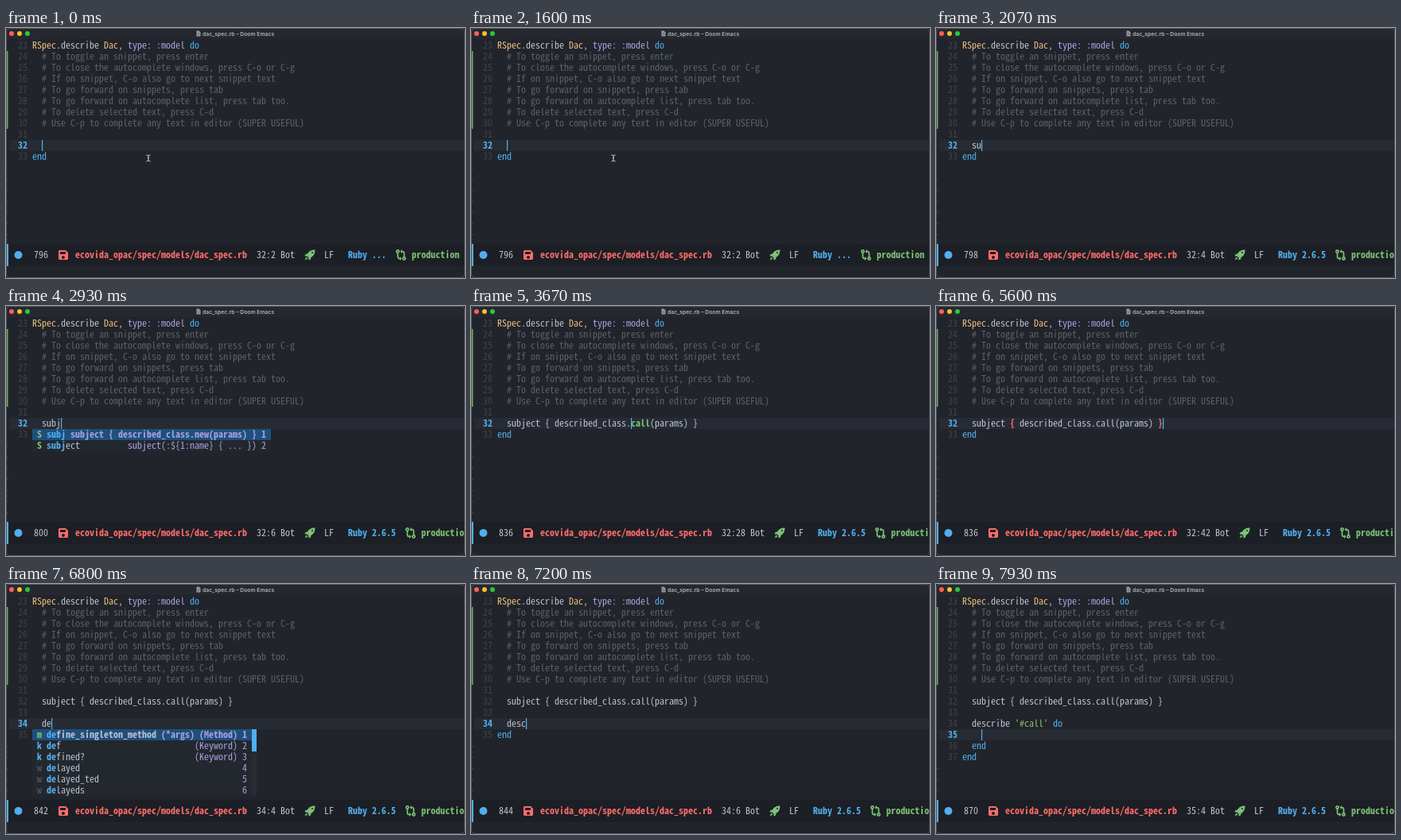
Recreate the animation shown at these times as an HTML page. Size 577 by 315 pixels, loop 8000 ms.

```html
<!DOCTYPE html>
<html lang="en">
<head>
<meta charset="utf-8">
<title>Snippets in the editor</title>
<style>
html, body { margin: 0; width: 100%; height: 100%; overflow: hidden; background: #21242b; }
svg { display: block; width: 577px; height: 315px; }
text { white-space: pre; font-family: "Noto Sans Mono CJK JP", "Noto Sans Mono", monospace; }
.title { font: 600 6.8px Inter, sans-serif; }
</style>
</head>
<body>
<svg id="stage" viewBox="0 0 577 315"></svg>
<script>
const LOOP = 8000, CELL = 6, ROW = 14, LEFT = 33, TOP = 15, FIRST = 23, ROWS = 18;
const BG = '#21242b', BAR = '#1c1f25', CURRENT = '#272b33';
// Run codes: one colour letter, upper case for bold, then the text.
const COLORS = {
  w: '#bbc2cf', y: '#ecbe7b', p: '#a9a1e1', b: '#51afef', c: '#5b6268',
  g: '#7bc275', s: '#98be65', r: '#ff6c6b', n: '#3f444a'
};
const stage = document.getElementById('stage');

// Choose the size at which one monospace cell is six pixels wide.
const meter = document.createElement('canvas').getContext('2d');
meter.font = '100px "Noto Sans Mono CJK JP", "Noto Sans Mono", monospace';
const fontSize = 100 * CELL / meter.measureText('m').width;

const rect = (x, y, w, h, fill) =>
  `<rect x="${x}" y="${y}" width="${w}" height="${h}" fill="${fill}"/>`;
const circle = (x, y, r, fill) => `<circle cx="${x}" cy="${y}" r="${r}" fill="${fill}"/>`;
const rowTop = row => TOP + row * ROW;

function runs(x, middle, line) {
  return line.split('|').map(run => {
    const code = run[0], text = run.slice(1), key = code.toLowerCase();
    const weight = code === key ? 400 : 700;
    const out = `<text x="${x}" y="${middle + 4}" font-size="${fontSize}" font-weight="${weight}" fill="${COLORS[key]}">${text}</text>`;
    x += text.length * CELL;
    return out;
  }).join('');
}

const HEAD = [
  'yRSpec|w.describe |yDac|w, |ptype: :model |bdo',
  ...[
    'To toggle an snippet, press enter',
    'To close the autocomplete windows, press C-o or C-g',
    'If on snippet, C-o also go to next snippet text',
    'To go forward on snippets, press tab',
    'To go forward on autocomplete list, press tab too.',
    'To delete selected text, press C-d',
    'Use C-p to complete any text in editor (SUPER USEFUL)'
  ].map(note => 'c  # ' + note),
  'w'
];
const SUBJECT = 'w  subject { described_class.call(params) }';

const SUBJECT_MENU = {
  cols: 50,
  rows: [
    'w |GS |Bsubj |Psubject { described_class.new(params) } 1',
    'w |GS |Bsubj|wect          |psubject(:${1:name} { ... }) 2'
  ]
};
const keyword = (kind, rest, note, number) =>
  `w |${kind} |Bde|w${rest}` + ' '.repeat(38 - rest.length - note.length) + `|p${note} ${number}`;
const DEF_MENU = {
  cols: 47,
  scroll: true,
  rows: [
    'w |Gm |Bde|Wfine_singleton_method |P(*args) (Method) 1',
    keyword('Bk', 'f', '(Keyword)', 2),
    keyword('Bk', 'fined?', '(Keyword)', 3),
    keyword('cw', 'layed', '', 4),
    keyword('cw', 'layed_ted', '', 5),
    keyword('cw', 'layeds', '', 6)
  ]
};

// Each step: start time, buffer size, cursor line and column, body lines, menu.
const steps = [];
const step = (time, size, line, col, body, menu) => steps.push({ time, size, line, col, body, menu });
function type(word, times, size, line, before) {
  times.forEach((time, i) =>
    step(time, size + i, line, 3 + i, [...before, 'w  ' + word.slice(0, i + 1)]));
}

step(0, 796, 32, 2, ['w']);
type('subj', [1930, 2070, 2200, 2400], 797, 32, []);
step(2600, 800, 32, 6, ['w  subj'], SUBJECT_MENU);
step(3330, 836, 32, 28, ['w  subject { described_class.|Gcall|w(params) }']);
step(5000, 836, 32, 42, ['w  subject |R{|w described_class.call(params) |R}']);
step(5930, 839, 33, 2, [SUBJECT, 'w']);
step(6070, 840, 34, 2, [SUBJECT, 'w', 'w']);
type('de', [6330, 6470], 841, 34, [SUBJECT, 'w']);
step(6600, 842, 34, 4, [SUBJECT, 'w', 'w  de'], DEF_MENU);
step(6930, 843, 34, 5, [SUBJECT, 'w', 'w  des']);
step(7070, 844, 34, 6, [SUBJECT, 'w', 'w  desc']);
step(7330, 870, 34, 13, [SUBJECT, 'w', "w  describe |s'#|Gcall|s'|b do", 'w', 'b  end']);
step(7670, 870, 35, 4, [SUBJECT, 'w', "w  describe |s'#call'|b do", 'w', 'b  end']);

function titleBar() {
  return rect(0, 0, 577, 14, '#25282e') +
    circle(7, 7, 3, '#ff5f57') + circle(17, 7, 3, '#febc2e') + circle(27, 7, 3, '#28c840') +
    '<path d="M239.500 3.500h3l2 2v5h-5z" fill="#9a9da3"/><path d="M240.500 6.500h3M240.500 8.500h3" stroke="#44474d" stroke-width=".6"/>' +
    '<text class="title" x="247" y="9.500" fill="#b4b6ba">dac_spec.rb – Doom Emacs</text>';
}

function editor({ line, col, body }) {
  const lines = [...HEAD, ...body, 'bend'];
  const current = line - FIRST;
  let out = rect(4, rowTop(current), 573, ROW, CURRENT);
  lines.forEach((text, i) => {
    const middle = rowTop(i) + 7;
    out += runs(15, middle, (i === current ? 'B' : 'n') + (FIRST + i)) + runs(LEFT, middle, text);
  });
  for (let i = lines.length; i < ROWS; i++) out += rect(1, rowTop(i) + 7, 2, 1, '#3f444a');
  return out + rect(1, rowTop(1), 1.5, 7 * ROW, '#72ad62') +
    rect(LEFT + col * CELL, rowTop(current), 1.2, ROW, COLORS.b);
}

function menuBox({ line, menu }) {
  if (!menu) return '';
  const top = rowTop(line - FIRST + 1), width = menu.cols * CELL, height = menu.rows.length * ROW;
  let out = rect(LEFT, top, width, height, '#23272e') + rect(LEFT, top, width, ROW, '#1f4f7c');
  menu.rows.forEach((row, i) => out += runs(LEFT, top + i * ROW + 7, row));
  if (menu.scroll) {
    const x = LEFT + width - CELL;
    out += rect(x, top, CELL, height, '#282c34') + rect(x, top, CELL, 2 * ROW, COLORS.b);
  }
  return out;
}

const floppy = `<path fill="${COLORS.r}" fill-rule="evenodd" d="M67 280h8l3 3v8l-1 1h-10l-1-1v-10zM68 282v3h7v-3zM72 287a2 2 0 1 0 .01 0z"/>`;
const rocket = x => `<g transform="translate(${x} 279.500)" fill="${COLORS.g}">
  <path d="M13 0C8 0 5 2 3.500 5L1 5.500L0 8H3L5 10V13L7.500 12L8 9.500C11 8 13 5 13 0Z"/>
  <path d="M2 9L0 13L4 11Z"/>${circle(9.5, 3.5, 1, BAR)}</g>`;
const branch = x => `<g transform="translate(${x} 279)" fill="none" stroke="${COLORS.g}" stroke-width="1.700">
  <circle cx="2.500" cy="2.500" r="1.600"/><circle cx="10.500" cy="11.500" r="1.600"/>
  <path d="M2.500 4V9Q2.500 11.500 5 11.500H6M10.500 10V5Q10.500 2.500 8 2.500H7"/>
  <path d="M5 9L7.500 11.500L5 14ZM8 0L5.500 2.500L8 5Z" fill="${COLORS.g}" stroke="none"/></g>`;

function modeLine({ time, size, line, col }) {
  const place = `${line}:${col}`, ruby = time ? 'Ruby 2.6.5' : 'Ruby ...';
  const end = 315 + place.length * CELL, git = end + 103 + ruby.length * CELL;
  return rect(0, 272, 577, 28, BAR) + rect(1, 272, 2, 28, COLORS.b) + circle(15.5, 286, 5, COLORS.b) +
    runs(35, 286, 'w' + size) + floppy + runs(87, 286, 'Recovida_opac/spec/models/dac_spec.rb') +
    runs(315, 286, `w${place} Bot`) + rocket(end + 36.5) + runs(end + 61, 286, 'wLF') +
    runs(end + 91, 286, 'B' + ruby) + branch(git) + runs(git + 20, 286, 'Gproduction');
}

const pointer = '<path d="M176.500 160q2.500 0 2.500 1.500q0-1.500 2.500-1.500M179 161v6M176.500 168q2.500 0 2.500-1.500q0 1.500 2.500 1.500M178 164h2" fill="none" stroke="#c8cacd"/>';
const windowEdge = '<rect x=".5" y=".5" width="576" height="314" rx="4" fill="none" stroke="#54575d"/>';

const start = performance.now();
let shown;
function play() {
  const time = (performance.now() - start) % LOOP;
  const state = steps.findLast(s => s.time <= time);
  if (state !== shown) {
    shown = state;
    stage.innerHTML = rect(0, 0, 577, 315, BG) + titleBar() + editor(state) +
      (state.time ? '' : pointer) + menuBox(state) + modeLine(state) + windowEdge;
  }
  requestAnimationFrame(play);
}
play();
</script>
</body>
</html>
```
